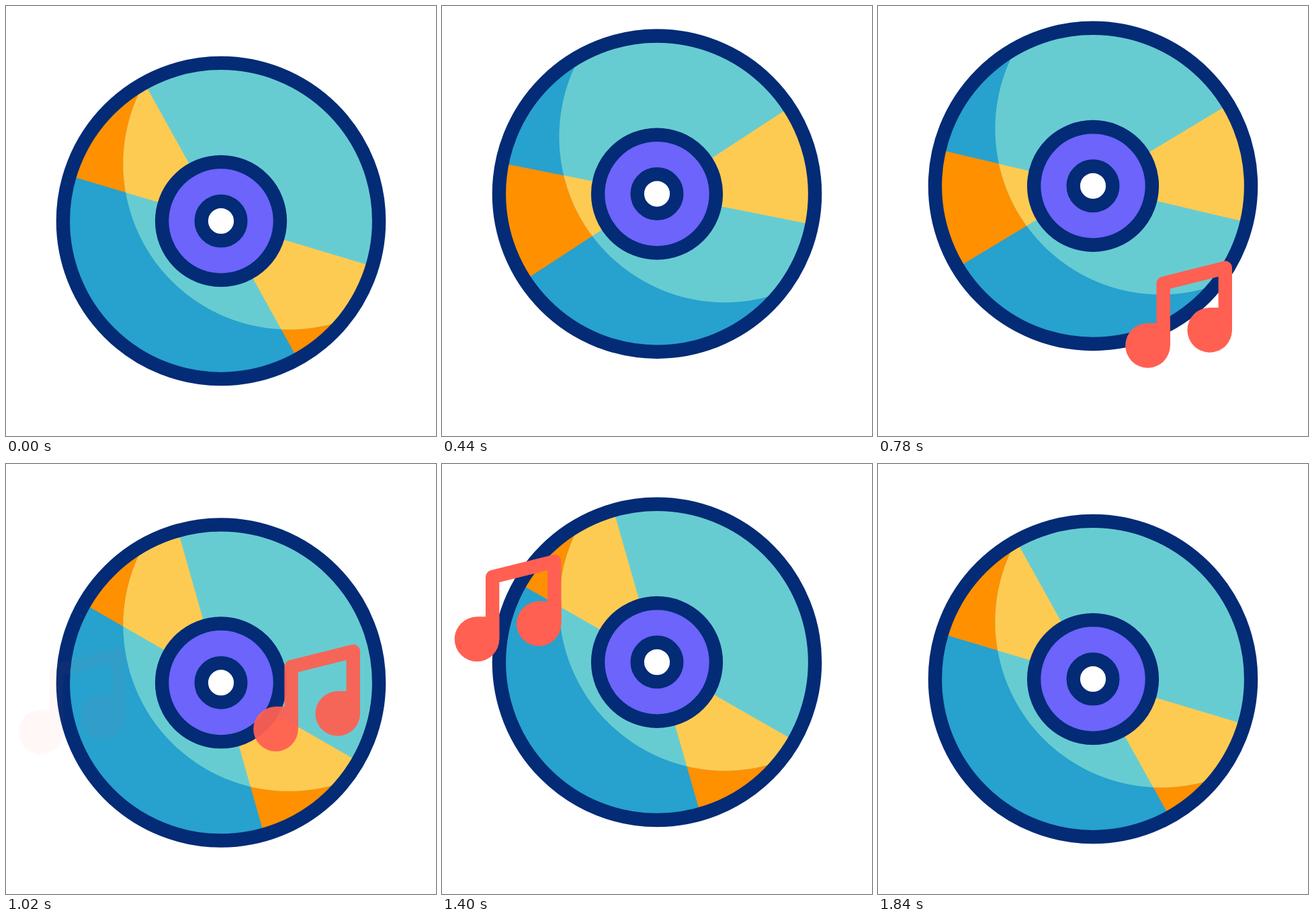
An HTML page for the animation above (2400 ms loop, 640 by 640 pixels).

```html
<!DOCTYPE html>
<html lang="en">
<head>
<meta charset="utf-8">
<title>Bouncing disc</title>
<style>
  html, body { margin: 0; width: 100%; height: 100%; overflow: hidden; background: #fff; }
  svg { display: block; width: 100%; height: 100%; }
</style>
</head>
<body>
<svg viewBox="0 0 640 640">
  <defs>
    <clipPath id="face"><circle r="230"/></clipPath>
    <clipPath id="shine"><circle cx="101" cy="-85" r="246.6"/></clipPath>
    <path id="wedge" d="M-300 -122.1L300 122.1V-122.1L-300 122.1Z"/>
    <g id="note" fill="#ff6052">
      <path d="M424.6 505.3V412.8L516.8 389.7V482.3" fill="none" stroke="#ff6052" stroke-width="20.4" stroke-linejoin="round"/>
      <path d="M401.5 472H434.8V505.3A33.3 33.3 0 1 1 401.5 472Z"/>
      <path d="M493.7 449H527V482.3A33.3 33.3 0 1 1 493.7 449Z"/>
    </g>
  </defs>
  <g id="disc">
    <g clip-path="url(#face)">
      <circle r="230" fill="#27a1ce"/>
      <use href="#wedge" class="spin" fill="#ff9000"/>
      <g clip-path="url(#shine)">
        <circle r="230" fill="#67ccd1"/>
        <use href="#wedge" class="spin" fill="#fecb52"/>
      </g>
    </g>
    <g stroke="#032b76" stroke-width="20.4">
      <circle r="235.1" fill="none"/>
      <circle r="87.9" fill="#6c64fb"/>
      <circle r="29.3" fill="#fff"/>
    </g>
  </g>
  <use href="#note" class="note"/>
  <use href="#note" class="note"/>
</svg>
<script>
const LOOP = 2400, STEP = 20, REST_ANGLE = 38.8;

// Each key is [time in ms, value]; values ease in and out between keys.
const lift = [[0, 0], [700, -58.7], [1165, 24.7], [1467, -32.3], [1833, 0]];
const swing = [[0, 0], [633, -64], [1235, 45], [1533, -10], [1833, 0]];
const rise = [[0, 0], [667, -215]];
const fade = [[0, 0], [167, 1], [425, 1], [683, 0]];
const notes = [
  { start: 556, x: 0, y: 56.5 },
  { start: 1000, x: -349.5, y: -105.4 }
];

const disc = document.getElementById("disc");
const wedges = document.querySelectorAll(".spin");
const noteEls = document.querySelectorAll(".note");

function at(keys, t) {
  if (t <= keys[0][0]) return keys[0][1];
  for (let i = 1; i < keys.length; i++) {
    const [t0, a] = keys[i - 1], [t1, b] = keys[i];
    if (t < t1) {
      const s = (t - t0) / (t1 - t0);
      return a + (b - a) * s * s * (3 - 2 * s);
    }
  }
  return keys[keys.length - 1][1];
}

function draw(t) {
  disc.setAttribute("transform", `translate(320 ${320 + at(lift, t)})`);
  const angle = REST_ANGLE + at(swing, t);
  wedges.forEach(w => w.setAttribute("transform", `rotate(${angle})`));
  notes.forEach((n, i) => {
    const age = t - n.start;
    noteEls[i].setAttribute("transform", `translate(${n.x} ${n.y + at(rise, age)})`);
    noteEls[i].setAttribute("opacity", at(fade, age));
  });
}

const begin = performance.now();
function tick() {
  const t = (performance.now() - begin) % LOOP;
  draw(Math.floor(t / STEP) * STEP);
  requestAnimationFrame(tick);
}
draw(0);
requestAnimationFrame(tick);
</script>
</body>
</html>
```
